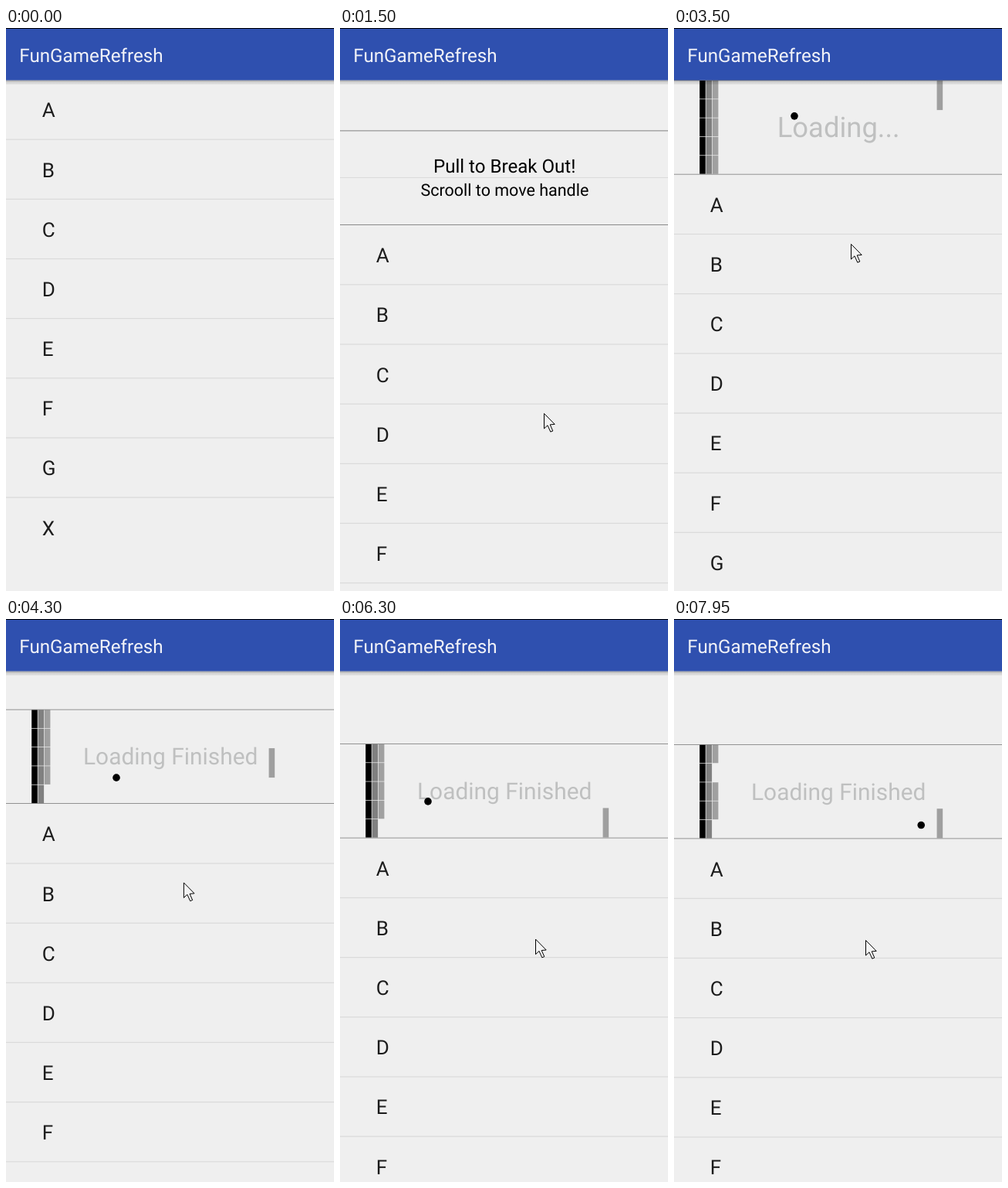
These frames come from a looping animation (425 px wide and 728 px high, 8 s). An HTML page:

```html
<!DOCTYPE html>
<html lang="en">
<head>
<meta charset="utf-8">
<title>FunGameRefresh</title>
<style>
  html, body { margin: 0; width: 100%; height: 100%; overflow: hidden; background: #efefef; }
  svg { display: block; font-family: Roboto, sans-serif; text-rendering: geometricPrecision; }
  #stage { width: 100vw; height: 100vh; }
  .mid { text-anchor: middle; }
  .rule { fill: #6c6c6c; }
</style>
</head>
<body>
<svg id="stage" viewBox="0 0 425 728">
  <defs>
    <linearGradient id="fall" x2="0" y2="1">
      <stop offset="0" stop-opacity=".38"/>
      <stop offset=".4" stop-opacity=".13"/>
      <stop offset="1" stop-opacity=".05"/>
    </linearGradient>
  </defs>
  <rect width="425" height="728" fill="#efefef"/>

  <svg id="head" width="425" height="122">
    <g id="blocks"></g>
    <rect id="paddle" x="340.6" width="7.6" height="38" fill="#9f9f9f"/>
    <text id="status" class="mid" x="213.2" fill="#bfc0c0"></text>
    <circle id="ball" r="4.8"/>
    <g id="cover">
      <rect id="shade" width="425" height="122" fill="#3a3a3a"/>
      <g id="upper">
        <rect width="425" height="61.2" fill="#efefef"/>
        <text class="mid" x="213.2" y="54.6" font-size="24.1">Pull to Break Out!</text>
      </g>
      <g id="lower">
        <rect y="61" width="425" height="62" fill="#efefef"/>
        <text class="mid" x="213.4" y="84.8" font-size="21.5">Scrooll to move handle</text>
      </g>
    </g>
  </svg>

  <rect id="topRule" class="rule" width="425" height=".7"/>
  <g id="list" fill="#1c1c1c"><rect class="rule" width="425" height=".7"/></g>

  <rect y="67.5" width="425" height="5.5" fill="url(#fall)"/>
  <rect width="425" height="67.5" fill="#2f50af"/>
  <rect width="425" height="1"/>
  <text x="17.3" y="43.5" font-size="24.2" fill="#f1f2f8">FunGameRefresh</text>

  <path id="cursor" d="M.5 .5V20L5 15.8 8.8 24.2 11.8 23 8.2 14.9 14.2 14.4Z" fill="#f4f4f4" stroke="#000"/>
</svg>
<script>
const LOOP = 8000, STEP = 50;
const CLOSED = 66.4, OPEN = 188.8, HEAD = 121.5, DRAG = .6075;
const ROW = 77.15, BLOCK = 24.3;
const PRESS = { first: 700, firstY: 189, second: 3650, secondY: 259 };
const RELEASE = 1550, PLAY = 2657, FINISHED = 3700;
const FIELD = { left: 63, right: 335, top: 5, height: 112.4 };
const SLOPE = Math.tan(Math.PI / 6), SERVE = { x: 325, y: 61 };

// turning points of the pointer: time, x, y
const POINTER = [
  [100, 430, 205], [700, 262, 189], [1500, 264, 498], [2450, 317, 444],
  [3500, 229, 279], [3650, 229, 259], [4400, 230, 353], [5500, 234, 286],
  [6300, 253, 413.6], [6600, 252, 413.6], [7150, 249, 308], [7700, 248, 415]
];
// the ball's pace: time, horizontal distance covered
const PACE = [[PLAY, 0], [3500, 169], [5100, 515], [6300, 755], [LOOP, 1103]];

const $ = id => document.getElementById(id);
const set = (node, attrs) => {
  for (const key in attrs) node.setAttribute(key, attrs[key]);
  return node;
};
const add = (parent, tag, attrs) =>
  set(parent.appendChild(document.createElementNS('http://www.w3.org/2000/svg', tag)), attrs);
const show = (node, on) => set(node, { visibility: on ? 'visible' : 'hidden' });
const move = (node, x, y) => set(node, { transform: `translate(${x} ${y})` });
const clamp = (v, lo, hi) => Math.min(hi, Math.max(lo, v));

function along(points, t, column = 1) {
  const next = points.findIndex(p => p[0] > t);
  if (next < 0) return points[points.length - 1][column];
  const b = points[next], a = points[Math.max(0, next - 1)];
  const k = a === b ? 0 : (t - a[0]) / (b[0] - a[0]);
  return a[column] + (b[column] - a[column]) * k;
}

// runs back and forth between 0 and span
function bounce(v, span) {
  const m = ((v % (2 * span)) + 2 * span) % (2 * span);
  return m < span ? m : 2 * span - m;
}

const width = FIELD.right - FIELD.left;
const ballX = d => FIELD.right - bounce(d + FIELD.right - SERVE.x, width);
const ballY = d => FIELD.top + bounce(d * SLOPE - (SERVE.y - FIELD.top), FIELD.height);

[...'ABCDEFGX'].forEach((letter, i) => {
  add($('list'), 'text', { x: 46.8, y: i * ROW + 49.1, 'font-size': 26 }).textContent = letter;
  if (i < 7) add($('list'), 'rect', { y: (i + 1) * ROW, width: 425, height: 1.2, fill: '#dadada' });
});

const outer = [];
['#000', '#808080', '#a0a0a0'].forEach((fill, col) => {
  for (let row = 0; row < 5; row++) {
    const block = add($('blocks'), 'rect',
      { x: 33.2 + col * 8.3, y: .6 + row * BLOCK, width: 7.6, height: BLOCK - .7, fill });
    if (col === 2) outer.push(block);
  }
});

function listTop(t, y) {
  if (t < PRESS.first) return CLOSED;
  if (t < RELEASE) return CLOSED + (Math.max(y, along(POINTER, Math.min(t, 1500), 2)) - PRESS.firstY) * DRAG;
  if (t < PRESS.second) return Math.max(OPEN, 254.1 - (t - RELEASE) * .6);
  return OPEN + Math.max(0, y - PRESS.secondY) * DRAG;
}

function breakBlocks(dist) {
  outer.forEach(block => show(block, true));
  for (let d = SERVE.x - FIELD.left; d < dist; d += 2 * width)
    show(outer[Math.floor(ballY(d) / BLOCK)], false);
}

function draw(t) {
  const px = along(POINTER, t), py = along(POINTER, t, 2);
  const top = listTop(t, py), headTop = top - HEAD;

  move($('list'), 0, top);
  set($('head'), { y: headTop });
  set($('topRule'), { y: headTop });
  set($('paddle'), { y: .8 + clamp(top - OPEN, 0, 82.4) });
  move($('cursor'), px, py);
  show($('cursor'), t > 100);

  const s = clamp((t - PLAY) / 800 + 1, 0, 1);
  const open = .5 - .5 * Math.cos(Math.PI * s);
  move($('upper'), 0, -61 * open);
  move($('lower'), 0, 61 * open);
  set($('shade'), { opacity: 1 - open });
  show($('cover'), s < 1);

  const done = t >= FINISHED;
  $('status').textContent = done ? 'Loading Finished' : 'Loading...';
  set($('status'), { y: done ? 71.6 : 74, 'font-size': done ? 29.9 : 36.4 });

  const dist = along(PACE, t);
  set($('ball'), { cx: ballX(dist), cy: ballY(dist) });
  show($('ball'), t >= PLAY);
  breakBlocks(dist);
}

const begin = performance.now();
function tick() {
  const t = (performance.now() - begin) % LOOP;
  draw(Math.floor(t / STEP) * STEP);
  requestAnimationFrame(tick);
}
tick();
</script>
</body>
</html>
```
